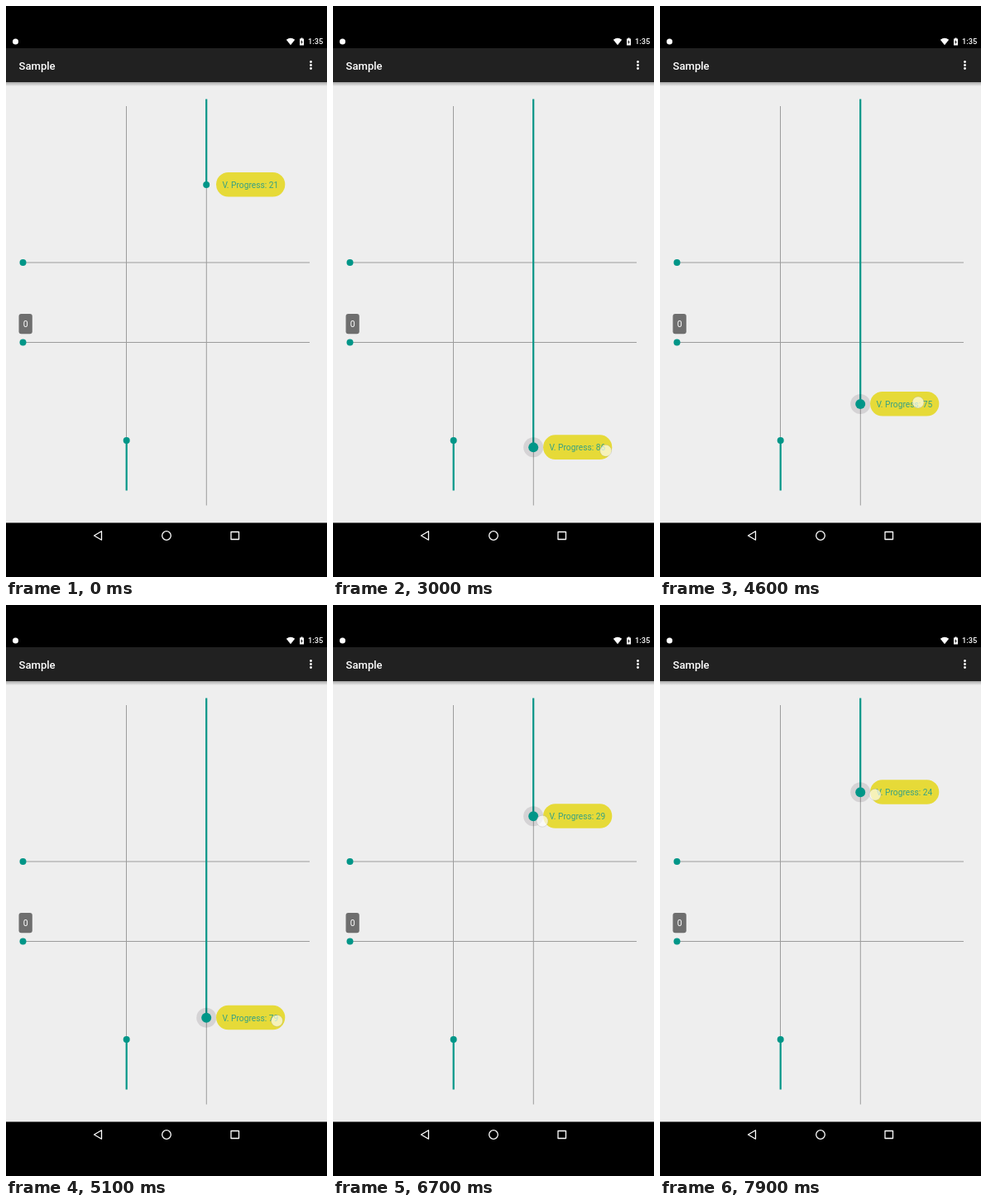
Animation of 388x690 px, one loop 8 s. Source, as an HTML page:

```html
<!DOCTYPE html>
<html lang="en">
<head>
<meta charset="utf-8">
<title>Sample</title>
<style>
  html, body { margin: 0; width: 100%; height: 100%; overflow: hidden; background: #000; }
  svg { display: block; font-family: Roboto, sans-serif; }
  .track { stroke: #9c9c9c; stroke-width: 1; }
  .fill { stroke: #009688; stroke-width: 2.2; }
  .dot { fill: #009688; }
  .nav { fill: none; stroke: #fff; stroke-width: 1.3; stroke-linejoin: round; }
</style>
</head>
<body>
<svg width="388" height="690" viewBox="0 0 388 690">
  <defs>
    <linearGradient id="shadow" x2="0" y2="1">
      <stop stop-color="#000" stop-opacity=".3"/>
      <stop offset="1" stop-color="#000" stop-opacity="0"/>
    </linearGradient>
  </defs>
  <rect width="388" height="690"/>
  <rect y="92" width="388" height="532.5" fill="#eee"/>
  <rect y="51" width="388" height="41" fill="#212121"/>
  <rect y="92" width="388" height="5" fill="url(#shadow)"/>

  <g fill="#fff">
    <circle cx="11.5" cy="43" r="3.5"/>
    <path d="M338.8 40.8Q344 36.800 349.200 40.800L344 47.300Z"/>
    <path d="M355 39.500h1.500v-1h2v1h1.500v8h-5z"/>
    <path d="M358 41l-2 2.800h1.300l-.4 2.400 2-3h-1.300z" fill="#000"/>
    <text x="365" y="46.300" font-size="9.300" font-weight="500">1:35</text>
    <text x="15.500" y="76.500" font-size="13.100" font-weight="500">Sample</text>
    <circle cx="368.500" cy="67.500" r="1.400"/>
    <circle cx="368.500" cy="71.500" r="1.400"/>
    <circle cx="368.500" cy="75.500" r="1.400"/>
  </g>

  <path class="track" d="M145.500 121V585M242.300 113V603.500M20 310H367M20 406.500H367"/>
  <path class="fill" d="M145.700 525V585.500"/>
  <circle class="dot" cx="145.700" cy="525" r="4"/>
  <circle class="dot" cx="20.500" cy="310" r="4"/>
  <circle class="dot" cx="20.500" cy="406.500" r="4"/>
  <rect x="15.500" y="372" width="16.300" height="24.300" rx="3" fill="#6e6e6e"/>
  <text x="23.600" y="388" font-size="10.500" fill="#fff" text-anchor="middle">0</text>

  <path class="fill" id="fill"/>
  <g id="slider">
    <circle id="halo" cx="242.200" r="12" fill="#201020" fill-opacity=".12"/>
    <circle id="thumb" class="dot" cx="242.200"/>
    <rect x="254" y="-15" width="83.300" height="29.600" rx="14.800" fill="#e6da38"/>
    <text id="label" x="261.500" y="3.800" font-size="10.200" fill="#36a184"></text>
  </g>
  <circle id="finger" r="7" fill="#fff" fill-opacity=".65" stroke="#777" stroke-opacity=".25" stroke-width=".8"/>

  <path class="nav" d="M106.500 640L115.500 634.800V645.200Z"/>
  <circle class="nav" cx="194" cy="640" r="5.300"/>
  <rect class="nav" x="272" y="635.500" width="9.500" height="9"/>
</svg>
<script>
const LOOP = 8000, STEP = 100, PRESS = 1700;
const TOP = 113, UNIT = 4.91;

// time, progress, finger x, finger offset below the thumb
const keys = [
  [1700, 20.98, 300, 4], [2400, 22.98, 307, 4.5], [2900, 93, 330, 4],
  [3400, 22, 325, 4], [3600, 51.95, 318, 8], [4000, 81, 316, 4],
  [4600, 74.95, 312, -2], [4900, 43, 318, 2], [5200, 91, 330, 4],
  [5600, 20.98, 316, 4], [5700, 20.98, 314, 5.5], [6100, 36, 285, 5],
  [6400, 20, 260, 3], [6700, 28.95, 253, 6], [7400, 53.5, 258, 4],
  [7900, 23.05, 260, 3]
];
const el = id => document.getElementById(id);
const [fill, slider, halo, thumb, label, finger] =
  ["fill", "slider", "halo", "thumb", "label", "finger"].map(el);

// Slopes are flat at turning points, so the motion never overshoots a key.
function slope(i, c) {
  if (!i || i === keys.length - 1) return 0;
  const rate = j => (keys[j + 1][c] - keys[j][c]) / (keys[j + 1][0] - keys[j][0]);
  const a = rate(i - 1), b = rate(i);
  return a * b > 0 ? 2 * a * b / (a + b) : 0;
}

function valueAt(t, c) {
  if (t <= keys[0][0]) return keys[0][c];
  const i = keys.findIndex(k => k[0] >= t) - 1;
  const a = keys[i], b = keys[i + 1], span = b[0] - a[0], u = (t - a[0]) / span;
  const ease = u * u * (3 - 2 * u);
  return a[c] + (b[c] - a[c]) * ease +
    span * u * (1 - u) * (slope(i, c) * (1 - u) - slope(i + 1, c) * u);
}

function draw(now) {
  const t = Math.floor(now % LOOP / STEP) * STEP;
  const pressed = t >= PRESS;
  const progress = valueAt(t, 1), y = TOP + progress * UNIT;
  fill.setAttribute("d", `M242.200 112.500V${y}`);
  slider.setAttribute("transform", `translate(0 ${y})`);
  thumb.setAttribute("r", pressed ? 6 : 4);
  label.textContent = `V. Progress: ${Math.ceil(progress)}`;
  halo.style.display = finger.style.display = pressed ? "" : "none";
  finger.setAttribute("cx", valueAt(t, 2));
  finger.setAttribute("cy", y + valueAt(t, 3));
  requestAnimationFrame(draw);
}
requestAnimationFrame(draw);
</script>
</body>
</html>
```
